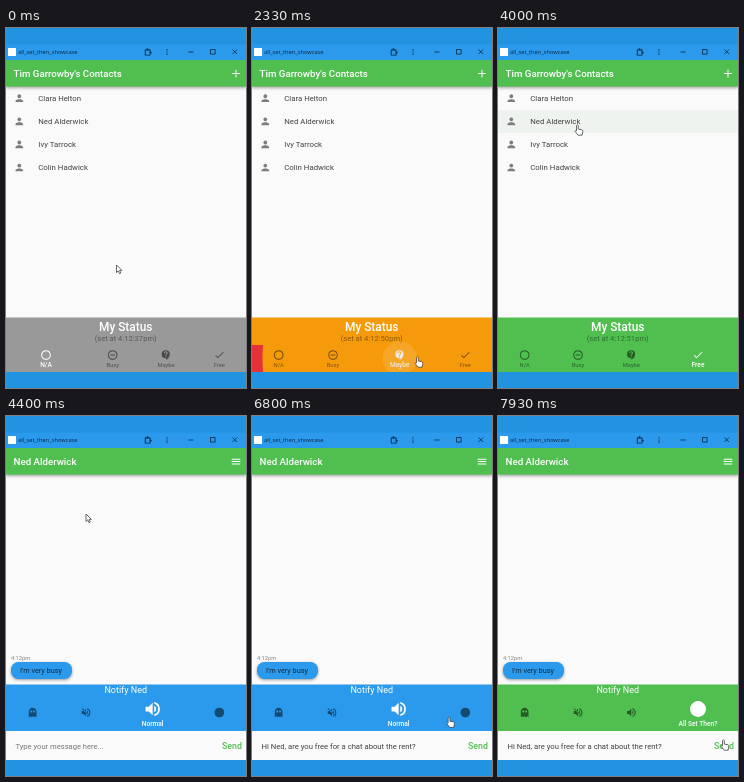
These frames come from a looping animation (240x360 px, 8 s). An HTML page with a canvas:

```html
<!DOCTYPE html>
<html lang="en">
<head>
<meta charset="utf-8">
<title>Contacts</title>
<style>
  html, body { margin: 0; width: 100%; height: 100%; overflow: hidden; }
  canvas { display: block; width: 100vw; height: 100vh; }
</style>
</head>
<body>
<canvas></canvas>
<script>
const W = 240, H = 360, LOOP = 8000;
const GREEN = '#50bf50', BLUE = '#2b99ec', PAPER = '#fafafa', INK = '#404040';
const canvas = document.querySelector('canvas');
const g = canvas.getContext('2d');
const scale = Math.max(1, devicePixelRatio || 1);
canvas.width = W * scale;
canvas.height = H * scale;

const volume = 'M3 9v6h4l5 5V4L7 9zM16.5 12c0-1.8-1-3.3-2.5-4v8c1.5-.7 2.5-2.2 2.5-4zM14 3.2v2.1a7 7 0 0 1 0 13.4v2.1a9 9 0 0 0 0-17.6z';
const ring = 'M12 2a10 10 0 1 0 .01 0zM12 4a8 8 0 1 0 .01 0z';
const icons = {
  ring,
  busy: ring + 'M7 11h10v2H7z',
  maybe: 'M11.5 2a8.5 8.5 0 0 0 0 17h.5v3c4.9-2.3 8-7 8-11.5A8.5 8.5 0 0 0 11.5 2zM12.5 16.5h-2v-2h2zM12.5 13h-2c0-3.2 3-3 3-5a2 2 0 0 0-4 0h-2a4 4 0 0 1 8 0c0 2.5-3 2.8-3 5z',
  check: 'M9 16.2 4.8 12l-1.4 1.4L9 19 21 7l-1.4-1.4z',
  person: 'M12 4a4 4 0 1 0 .01 0zM12 14c-2.7 0-8 1.3-8 4v2h16v-2c0-2.7-5.3-4-8-4z',
  ghost: 'M12 2c-5 0-8 4-8 8v12l2.7-2 2.6 2 2.7-2 2.7 2 2.6-2 2.7 2V10c0-4-3-8-8-8zM9 8a2 2 0 1 0 .01 0zM15 8a2 2 0 1 0 .01 0z',
  volume,
  mute: volume + 'M3 4.3 4.3 3 21 19.7 19.7 21z',
  disc: 'M12 2a10 10 0 1 0 .01 0z',
  plus: 'M11 4h2v7h7v2h-7v7h-2v-7H4v-2h7z',
  menu: 'M3 6h18v2H3zM3 11h18v2H3zM3 16h18v2H3z',
  dots: 'M12 3a2 2 0 1 0 .01 0zM12 10a2 2 0 1 0 .01 0zM12 17a2 2 0 1 0 .01 0z',
  puzzle: 'M3 5h5V4a2.5 2.5 0 0 1 5 0v1h6v6h1a2.5 2.5 0 0 1 0 5h-1v6H3zM5.5 7.5h11v12h-11z'
};
for (const k in icons) icons[k] = new Path2D(icons[k]);

const pointers = {
  arrow: new Path2D('M0 0v7.500l1.800-1.600 1.200 2.800 1.300-.6-1.200-2.700h2.300z'),
  hand: new Path2D('M-1.500-.5q1-1.200 1.800 0v3.600l3.600.7q1.100.4.9 1.800l-.7 3.600H.1l-3-3.800q0-1.200 1.400-.5z')
};

// start, end, x, y, pointer
const moves = [
  [0, 0, 110.5, 237, 'arrow'],
  [130, 330, 110, 329, 'hand'],
  [1670, 1940, 166, 330, 'hand'],
  [2530, 2800, 213, 330, 'hand'],
  [3600, 4000, 80, 98, 'hand'],
  [4200, 4200, 80, 98, 'arrow'],
  [5000, 5330, 92, 341, 'beam'],
  [6470, 6880, 209, 298, 'hand'],
  [7400, 7900, 226, 325, 'hand']
];

const status = {
  top: 317, height: 27, iconY: 327, labelY: 338.7, big: 11.5, small: 11.5, labels: true,
  items: [['ring', 'N/A', '#999999'], ['busy', 'Busy', '#e53238'], ['maybe', 'Maybe', '#f59b0b'], ['check', 'Free', GREEN]],
  taps: [[-1e4, -1e4, 0], [800, 1216, 1], [2000, 2196, 2], [3100, 3414, 3]]
};
const notify = {
  top: 279, height: 36, iconY: 296.5, labelY: 310, big: 19, small: 11.5, labels: false,
  items: [['ghost', 'Hidden', BLUE], ['mute', 'Silent', BLUE], ['volume', 'Normal', BLUE], ['disc', 'All Set Then?', GREEN]],
  taps: [[-1e4, -1e4, 2], [6930, 7186, 3]]
};
const setTimes = [37, 49, 50, 51];
const people = ['Clara Helton', 'Ned Alderwick', 'Ivy Tarrock', 'Colin Hadwick'];
const message = 'Hi Ned, are you free for a chat about the rent?';

const clamp = v => Math.min(1, Math.max(0, v));
const mix = (a, b, p) => a + (b - a) * p;
const smooth = p => p * p * (3 - 2 * p);

// cubic-bezier(.4, 0, .2, 1)
function ease(u) {
  u = clamp(u);
  let lo = 0, hi = 1, s = u;
  for (let i = 0; i < 20; i++) {
    s = (lo + hi) / 2;
    const q = 1 - s;
    if (1.2 * q * q * s + 0.6 * q * s * s + s ** 3 < u) lo = s; else hi = s;
  }
  return 3 * (1 - s) * s * s + s ** 3;
}

function rect(x, y, w, h, color) {
  g.fillStyle = color;
  g.fillRect(x, y, w, h);
}

function text(str, x, y, size, color, align = 'left', weight = 400, family = 'Roboto') {
  g.font = `${weight} ${size}px "${family}", sans-serif`;
  g.textAlign = align;
  g.fillStyle = color;
  g.fillText(str, x, y);
}

function icon(name, x, y, size, color) {
  g.save();
  g.translate(x, y);
  g.scale(size / 24, size / 24);
  g.translate(-12, -12);
  g.fillStyle = color;
  g.fill(icons[name], 'evenodd');
  g.restore();
}

function disc(x, y, r, color) {
  g.beginPath();
  g.arc(x, y, Math.max(0, r), 0, 7);
  g.fillStyle = color;
  g.fill();
}

function selected(bar, t) {
  const n = bar.taps.findLastIndex(tap => t >= tap[1]);
  return { n, now: bar.taps[n][2], was: bar.taps[Math.max(0, n - 1)][2], p: ease((t - bar.taps[n][1]) / 200) };
}

function drawBar(bar, t) {
  const { now, was, p } = selected(bar, t);
  const active = bar.items.map((_, i) => (i === now ? p : 0) + (i === was && was !== now ? 1 - p : 0));
  const unit = W / active.reduce((sum, a) => sum + 1 + a / 2, 0);
  let left = 0;
  const centers = active.map(a => {
    const w = unit * (1 + a / 2);
    left += w;
    return left - w / 2;
  });
  const midY = bar.top + bar.height / 2;

  g.save();
  g.beginPath();
  g.rect(0, bar.top, W, bar.height);
  g.clip();
  rect(0, bar.top, W, bar.height, bar.items[was][2]);
  const cx = centers[now];
  disc(cx, midY, p * Math.hypot(Math.max(cx, W - cx), bar.height / 2), bar.items[now][2]);
  g.restore();

  for (const [press, release, i] of bar.taps) {
    if (t < press || t > release + 300) continue;
    const grow = smooth(clamp((t - press) / (release - press + 80)));
    const fade = 1 - clamp((t - release) / 300);
    disc(centers[i], midY, 17 * grow, `rgba(255,255,255,${0.2 * fade})`);
  }

  bar.items.forEach(([name, label], i) => {
    const a = active[i], v = Math.round(255 * a);
    const tint = alpha => `rgba(${v},${v},${v},${alpha})`;
    const y = bar.labels ? bar.iconY : mix(bar.iconY, bar.iconY - 3.5, a);
    icon(name, centers[i], y, mix(bar.small, bar.big, a), tint(mix(0.52, 1, a)));
    const alpha = bar.labels ? mix(0.48, 1, a) : a;
    if (alpha > 0) text(label, centers[i], bar.labelY, mix(5.76, 6.6, a), tint(alpha), 'center', a > 0.5 ? 500 : 400);
  });
}

function appBar(title, action) {
  g.save();
  g.shadowColor = 'rgba(0,0,0,.35)';
  g.shadowBlur = 3 * scale;
  g.shadowOffsetY = scale;
  rect(0, 32, W, 26.6, GREEN);
  g.restore();
  text(title, 7.6, 49, 9.7, '#fff', 'left', 500);
  icon(action, 230, 45.6, 11.5, '#fff');
}

function contactsPage(t) {
  rect(0, 32, W, 312, PAPER);
  if (t > 3900) rect(0, 82, W, 23, '#eff3ef');
  appBar("Tim Garrowby's Contacts", 'plus');
  people.forEach((name, i) => {
    const y = 70.2 + 23.1 * i;
    icon('person', 13.3, y, 11.5, '#7d7d7d');
    text(name, 32.3, y + 2.8, 7.8, INK);
  });
  const { n, now } = selected(status, t);
  rect(0, 289.5, W, 28.5, status.items[now][2]);
  text('My Status', 119.7, 303, 11.9, '#fff', 'center', 500);
  text(`(set at 4:12:${setTimes[n]}pm)`, 119.7, 313.1, 7.6, 'rgba(0,0,0,.42)', 'center');
  drawBar(status, t);
}

function chatPage(t) {
  rect(0, 32, W, 312, PAPER);
  appBar('Ned Alderwick', 'menu');
  text('4:12pm', 5, 244, 5.76, '#858585');
  g.save();
  g.shadowColor = 'rgba(0,0,0,.4)';
  g.shadowBlur = 3 * scale;
  g.shadowOffsetY = scale;
  g.beginPath();
  g.roundRect(5, 246, 61, 17, 7.5);
  g.fillStyle = BLUE;
  g.fill();
  g.restore();
  text("I'm very busy", 14, 257.2, 7.3, '#15293a');

  rect(0, 268.5, W, 10.5, notify.items[selected(notify, t).now][2]);
  text('Notify Ned', 119.7, 276.8, 9, '#fff', 'center');
  drawBar(notify, t);

  const typed = Math.ceil(clamp((t - 6070) / 130) * message.length);
  if (typed) text(message.slice(0, typed), 9.5, 332.5, 7.68, INK);
  else text('Type your message here...', 9.5, 332.5, 7.6, '#777');
  if (t >= 5470 && t < 6070) rect(9.5, 326, 1, 8, BLUE);
  text('Send', 226, 333, 8.8, GREEN, 'center', 500);
}

function titleBar() {
  const dark = 'rgba(0,10,20,.8)';
  rect(0, 0, W, H, '#2193df');
  rect(0, 16.5, W, 15.5, BLUE);
  rect(2, 20, 8, 8, '#fff');
  text('all_set_then_showcase', 12, 26, 5.7, dark, 'left', 400, 'Open Sans');
  icon('puzzle', 142, 24, 8.5, dark);
  icon('dots', 161, 24, 7.5, dark);
  g.strokeStyle = dark;
  g.lineWidth = 0.8;
  g.beginPath();
  g.moveTo(182.5, 24); g.lineTo(187.5, 24);
  g.rect(204.5, 21.5, 4.6, 4.6);
  g.moveTo(226.5, 21.5); g.lineTo(231, 26);
  g.moveTo(231, 21.5); g.lineTo(226.5, 26);
  g.stroke();
}

function drawPointer(t) {
  let [, , x, y, kind] = moves[0];
  for (const [from, to, nx, ny, next] of moves) {
    if (t < from) break;
    const p = to > from ? smooth(clamp((t - from) / (to - from))) : 1;
    x = mix(x, nx, p);
    y = mix(y, ny, p);
    if (p >= 0.5) kind = next;
  }
  g.save();
  g.translate(x, y);
  g.strokeStyle = '#444';
  g.lineWidth = 0.8;
  if (kind === 'beam') {
    g.beginPath();
    g.moveTo(-1.5, -4); g.lineTo(1.5, -4);
    g.moveTo(0, -4); g.lineTo(0, 3);
    g.moveTo(-1.5, 3); g.lineTo(1.5, 3);
    g.stroke();
  } else {
    g.fillStyle = '#fff';
    g.fill(pointers[kind]);
    g.stroke(pointers[kind]);
  }
  g.restore();
}

function draw(t) {
  g.setTransform(scale, 0, 0, scale, 0, 0);
  titleBar();
  g.save();
  g.beginPath();
  g.rect(0, 32, W, 312);
  g.clip();
  const open = clamp((t - 4130) / 270);
  if (open < 1) contactsPage(t);
  if (open > 0) {
    g.globalAlpha = open * open;
    g.translate(0, 78 * (1 - ease(open)));
    chatPage(t);
  }
  g.restore();
  drawPointer(t);
}

function frame() {
  draw(performance.now() % LOOP);
  requestAnimationFrame(frame);
}
frame();
</script>
</body>
</html>
```
